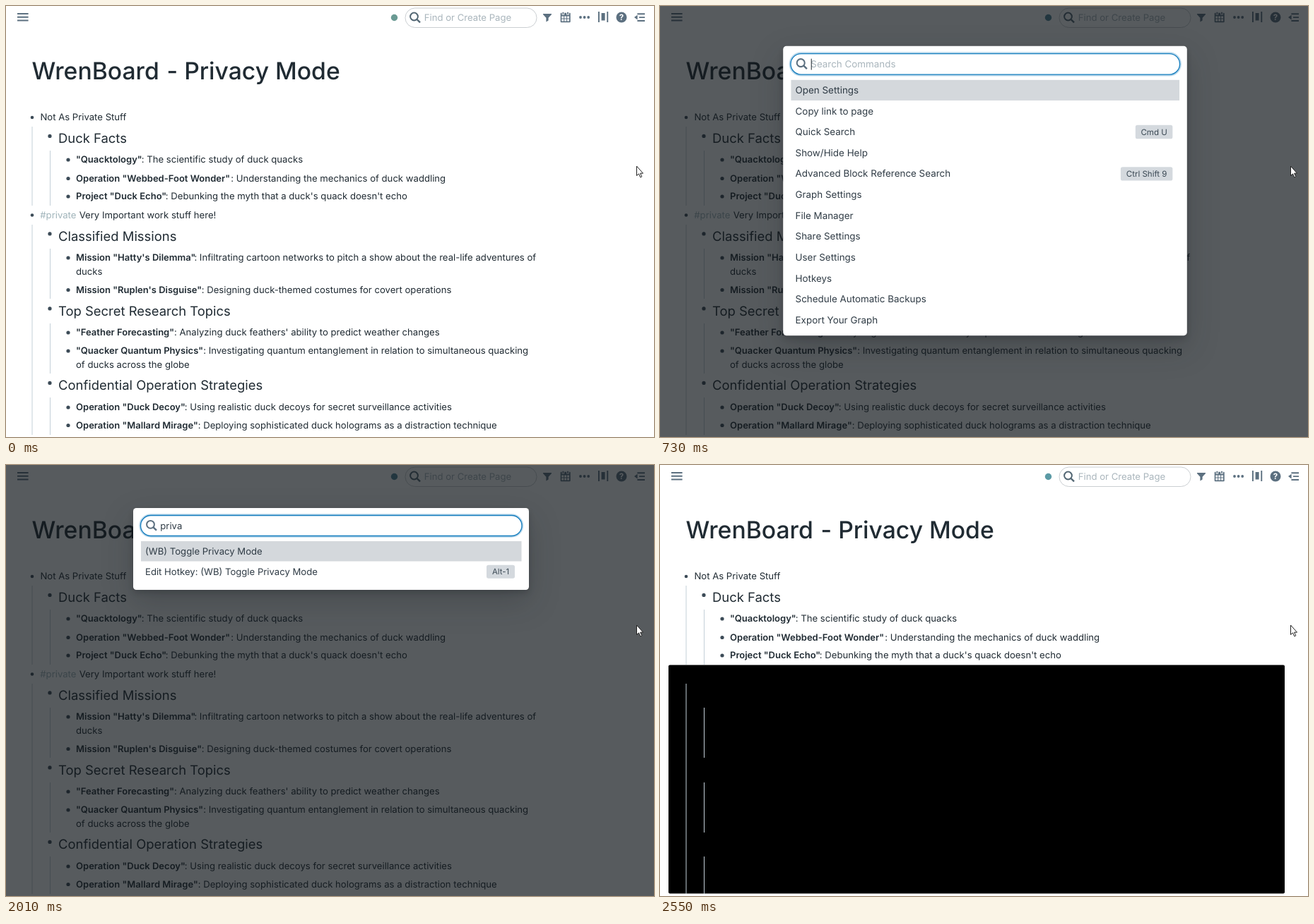
Write an HTML page that moves like this. It is 917x611 px and loops after 4.35 s.

```html
<!DOCTYPE html>
<html lang="en">
<head>
<meta charset="utf-8">
<title>Privacy Mode</title>
<style>
  html, body { margin: 0; width: 100%; height: 100%; overflow: hidden; background: #fff; }
  svg { display: block; width: 100%; height: 100%; }
  text {
    font: 400 13.13px Inter, "Open Sans", sans-serif;
    font-optical-sizing: none;
    text-rendering: geometricPrecision;
    fill: #202b33;
    white-space: pre;
  }
  .title { font-size: 33.7px; font-weight: 500; }
  .head { font-size: 18.45px; }
  .bold { font-size: 13.02px; font-weight: 600; }
  .tag { fill: #a0b4ba; }
  .hint { fill: #a9b5bc; }
  .row { fill: #2f3b45; }
  .key { font-size: 11.3px; fill: #3b4954; text-anchor: middle; }
  .help { font-size: 11.5px; font-weight: 700; fill: #fff; text-anchor: middle; }
  .panel { fill: #fff; filter: drop-shadow(0 4px 3.7px rgba(16,22,26,.2)) drop-shadow(0 16.7px 21.4px rgba(16,22,26,.22)); }
</style>
</head>
<body>
<svg id="stage" viewBox="0 0 917 611" xmlns="http://www.w3.org/2000/svg">
  <rect width="917" height="611" fill="#fff"/>
  <g id="bar">
    <g fill="#5c7080">
      <path d="M16 10h15.6v2H16zM16 14.8h15.6v2H16zM16 19.6h15.6v2H16z"/>
      <path d="M760.2 11h11.6q.6 .6 0 1.2l-4.2 4.6v3.6l-3.2 2.2v-5.8l-4.2-4.6q-.6-.6 0-1.2z"/>
      <circle cx="813" cy="16" r="1.9"/><circle cx="818.6" cy="16" r="1.9"/><circle cx="824.2" cy="16" r="1.9"/>
      <path d="M838 8h1.9v15H838zM842.6 10h5v10.6h-5zM850.3 8h1.9v15h-1.9z"/>
      <circle cx="871" cy="16" r="7.5"/>
      <path d="M893.4 10.3H904v1.9h-10.600zM896 15.200h8v1.900h-8zM893.400 20H904v1.900h-10.600zM889 16.100l4.600-3.400v6.800z"/>
      <rect x="784.700" y="9.700" width="14" height="13.500" rx="1"/>
    </g>
    <path fill="#fff" d="M786.300 14.600h2.900v2.900h-2.900zM790.200 14.600h2.900v2.900h-2.900zM794.100 14.600h2.900v2.900h-2.900zM786.300 18.500h2.900v2.900h-2.900zM790.200 18.500h2.900v2.900h-2.900zM794.100 18.500h2.900v2.900h-2.900z"/>
    <path stroke="#fff" stroke-width="3.600" d="M788.400 9v3.500M795 9v3.500"/>
    <path stroke="#5c7080" stroke-width="1.800" d="M788.400 8.700v2.900M795 8.700v2.900"/>
    <text class="help" x="871" y="20.2">?</text>
    <rect x="565" y="3" width="186" height="27.5" rx="13.7" fill="#fff" stroke="#cbcfd2"/>
    <g fill="none" stroke="#526673" stroke-width="2">
      <circle cx="577.5" cy="15" r="5.4"/><path d="M581.5 19l4.5 4.3" stroke-width="2.4"/>
    </g>
    <text class="hint" x="591.8" y="21">Find or Create Page</text>
    <circle id="dot" cx="549.5" cy="16.5" r="4.7"/>
  </g>
  <g id="page"></g>
  <rect id="cover" x="12" y="283.5" width="872" height="324" rx="2"/>
  <path id="guides" fill="none" stroke="#c3d0d8" d="M37 171V283M62.5 205V283M37 310V608M62.5 344V415M62.5 450V521M62.5 555V608"/>
  <rect id="shade" width="917" height="611" fill="#10161a"/>
  <g id="modal">
    <rect id="panel" class="panel" x="180" y="61" width="560" rx="4.5"/>
    <rect x="189.5" y="70.5" width="541.5" height="31" rx="15.5" fill="none" stroke="#137cbd" stroke-opacity=".3" stroke-width="2.5"/>
    <rect x="190.5" y="71.5" width="539.5" height="29" rx="14.5" fill="#fff" stroke="#137cbd" stroke-width="1.3"/>
    <g fill="none" stroke="#5c7080" stroke-width="2">
      <circle cx="204.5" cy="84.3" r="5.4"/><path d="M208.5 88.3l4.5 4.3" stroke-width="2.4"/>
    </g>
    <text id="hint" class="hint" x="218.3" y="91">Search Commands</text>
    <text id="query" class="row" x="218.3" y="91"></text>
    <rect id="caret" y="78.5" width="1" height="15.5" fill="#202b33"/>
    <rect x="191" y="108" width="538.5" height="28.5" fill="#d4d8dc"/>
    <g id="lists"></g>
  </g>
  <path fill="#fff" stroke="#222" stroke-linejoin="round" d="M892.5 227v13.5l3-2.6 2.3 5 2-1-2.2-4.7h3.9z"/>
</svg>
<script>
const $ = id => document.getElementById(id);
const text = (x, y, s, cls = '') => `<text x="${x}" y="${y}" class="${cls}">${s}</text>`;
const bullet = (x, y, r) => `<circle cx="${x}" cy="${y}" r="${r}" fill="#3c4b57"/>`;
const head = (y, s) => bullet(62, y - 9.6, 2.6) + text(74, y, s, 'head');
const item = (y, name, x, rest) =>
  bullet(88, y - 4, 2.6) + text(99, y, name, 'bold') + text(x, y, ': ' + rest);

$('page').innerHTML = [
  text(36.6, 104, 'WrenBoard', 'title'),
  text(227.5, 104, '-', 'title'),
  text(252.2, 104, 'Privacy Mode', 'title'),
  bullet(37, 158, 2.3),
  text(48.4, 162, 'Not As Private Stuff'),
  head(194, 'Duck Facts'),
  item(222, '"Quacktology"', 191.8, 'The scientific study of duck quacks'),
  item(248.5, 'Operation "Webbed-Foot Wonder"', 318.2, 'Understanding the mechanics of duck waddling'),
  item(274, 'Project "Duck Echo"', 225.8, "Debunking the myth that a duck's quack doesn't echo"),
  bullet(37, 296.5, 2.3),
  text(48.3, 300.5, '#private', 'tag'),
  text(103.7, 300.5, 'Very Important work stuff here!'),
  head(332.5, 'Classified Missions'),
  item(361, `Mission "Hatty's Dilemma"`, 266.4, 'Infiltrating cartoon networks to pitch a show about the real-life adventures of'),
  text(99, 380.5, 'ducks'),
  item(406.5, `Mission "Ruplen's Disguise"`, 276.7, 'Designing duck-themed costumes for covert operations'),
  head(438.5, 'Top Secret Research Topics'),
  item(467, '"Feather Forecasting"', 238, "Analyzing duck feathers' ability to predict weather changes"),
  item(493, '"Quacker Quantum Physics"', 279.2, 'Investigating quantum entanglement in relation to simultaneous quacking'),
  text(99, 512.5, 'of ducks across the globe'),
  head(544, 'Confidential Operation Strategies'),
  item(573, 'Operation "Duck Decoy"', 252.8, 'Using realistic duck decoys for secret surveillance activities'),
  item(598.5, 'Operation "Mallard Mirage"', 271.7, 'Deploying sophisticated duck holograms as a distraction technique')
].join('');

// Each row: label, then key pills as [left, width, text].
const toggle = '(WB) Toggle Privacy Mode';
const hotkey = ['Edit Hotkey: ' + toggle, [680, 40, 'Alt-1']];
const lists = [
  { height: 402, rows: [
    ['Open Settings'], ['Copy link to page'],
    ['Quick Search', [668.5, 51.5, 'Cmd U']],
    ['Show/Hide Help'],
    ['Advanced Block Reference Search', [648, 72, 'Ctrl Shift 9']],
    ['Graph Settings'], ['File Manager'], ['Share Settings'], ['User Settings'],
    ['Hotkeys'], ['Schedule Automatic Backups'], ['Export Your Graph']
  ] },
  { height: 232, rows: [
    [toggle],
    ['Edit Hotkey: Go to Previous Day', [655.5, 64.5, 'Ctrl-alt-p']],
    ['Edit Hotkey: Go to Previous Block', [641, 35, 'C-c'], [685, 35, 'C-n']],
    ['Edit Hotkey: Toggle Block Preview', [641, 35, 'C-c'], [684, 36, 'C-p']],
    ['Edit Hotkey: Cycle version previous', [613, 107, 'Ctrl-shift-comma']],
    hotkey
  ] },
  { height: 116, rows: [[toggle], hotkey] }
];

const pill = (y, [x, w, s]) =>
  `<rect x="${x}" y="${y - 9.5}" width="${w}" height="19" rx="2.8" fill="#d4d9de"/>` +
  text(x + w / 2, y + 4, s, 'key');

$('lists').innerHTML = lists.map(({ rows }) => '<g>' + rows.map(([label, ...keys], i) => {
  const y = 122.2 + i * 29.03;
  return text(197, y + 4.5, label, 'row') + keys.map(k => pill(y, k)).join('');
}).join('') + '</g>').join('');

function bezier(x1, y1, x2, y2) {
  const at = (a, b, s) => 3 * (1 - s) ** 2 * s * a + 3 * (1 - s) * s * s * b + s ** 3;
  return x => {
    if (x <= 0) return 0;
    if (x >= 1) return 1;
    let lo = 0, hi = 1;
    for (let i = 0; i < 30; i++) {
      const mid = (lo + hi) / 2;
      if (at(x1, x2, mid) < x) lo = mid; else hi = mid;
    }
    return at(y1, y2, lo);
  };
}
const bounce = bezier(.54, 1.12, .38, 1.125);
const ease = bezier(.4, 1, .75, .9);

const LOOP = 4350, OPEN = 501, CLOSE = 2320, DONE = 2550;
const ticks = [0, 590, 660, 730, 790, 860, 930, 1060, 1190, 1390, 1460, 2010, 2340, 2410, 2480, DONE];
const keyTimes = [930, 1060, 1190, 1390, 1460];

function draw(time) {
  const t = ticks.filter(k => k <= time).pop();
  const open = t >= 590 && t < DONE;
  const closed = t >= CLOSE;

  $('cover').style.display = closed ? '' : 'none';
  $('dot').setAttribute('fill', open ? '#4f8496' : closed ? '#5b9aa5' : '#6a9a93');
  $('shade').style.display = $('modal').style.display = open ? '' : 'none';
  if (!open) return;

  const shade = closed ? 1 - ease((t - CLOSE) / 200) : ease((t - OPEN - 24) / 200);
  $('shade').setAttribute('opacity', .7 * shade);

  const typed = keyTimes.filter(k => k <= t).length;
  const active = typed < 2 ? 0 : typed < 3 ? 1 : 2;
  [...$('lists').children].forEach((g, i) => g.style.display = i === active ? '' : 'none');
  const { height } = lists[active];
  $('panel').setAttribute('height', height);

  $('hint').style.display = typed ? 'none' : '';
  $('query').textContent = 'priva'.slice(0, typed);
  const width = typed ? $('query').getComputedTextLength() : 0;
  $('caret').setAttribute('x', 218.7 + width);
  $('caret').style.display = t < 2010 ? '' : 'none';

  const show = closed ? 1 - bounce((t - CLOSE) / 400) : bounce((t - OPEN) / 400);
  const cy = 61 + height / 2;
  $('modal').setAttribute('opacity', Math.min(1, Math.max(0, show)));
  $('modal').setAttribute('transform',
    `translate(460 ${cy}) scale(${.5 + show / 2}) translate(-460 ${-cy})`);
}

const start = performance.now();
function frame() {
  draw((performance.now() - start) % LOOP);
  requestAnimationFrame(frame);
}
frame();
</script>
</body>
</html>
```
